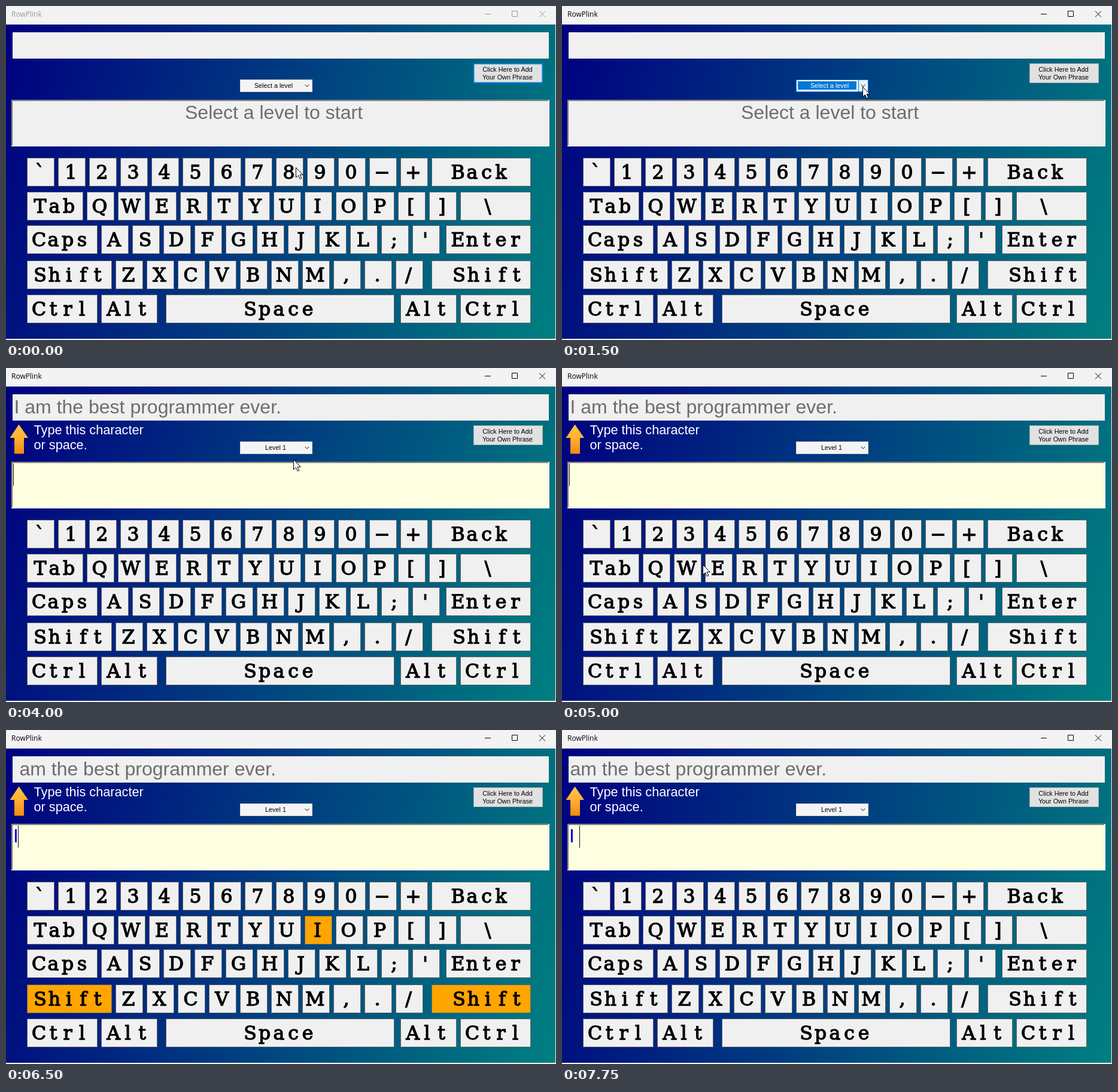
An HTML page that plays this animation: 919 by 559 pixels, repeating every 8 s.

```html
<!DOCTYPE html>
<html lang="en">
<head>
<meta charset="utf-8">
<title>RowPlink</title>
<style>
  html, body { margin: 0; width: 100%; height: 100%; overflow: hidden; }
  svg { display: block; width: 100vw; height: 100vh; }
  text { font-family: "Liberation Sans", Arial, sans-serif; white-space: pre; }
  .title { font: 12px "Open Sans", "Noto Sans", sans-serif; }
  .small { font-size: 10.8px; text-anchor: middle; }
  .big { font-size: 32px; fill: #6d6d6d; }
  .hint { font-size: 21.7px; fill: #fff; }
  .key { fill: #f0f0f0; stroke: #646464; }
  .key.on { fill: #ffa500; }
  .label { font: 31.5px "DejaVu Serif", "Noto Serif", serif; text-anchor: middle; stroke: #000; stroke-width: 1.3; }
  .line { fill: none; stroke: #111; }
</style>
</head>
<body>
<svg viewBox="0 0 919 559" preserveAspectRatio="none">
  <defs>
    <linearGradient id="sea" gradientUnits="userSpaceOnUse" x1="0" y1="30" x2="990" y2="295">
      <stop offset="0" stop-color="#000080"/><stop offset="1" stop-color="#008080"/>
    </linearGradient>
    <linearGradient id="amber" x1="0" y1="0" x2="0" y2="1">
      <stop offset="0" stop-color="#ffc64a"/><stop offset=".45" stop-color="#ffb133"/><stop offset="1" stop-color="#f58a10"/>
    </linearGradient>
  </defs>

  <rect width="919" height="559" fill="#f3f3f3"/>
  <rect y="31" width="918" height="526" fill="url(#sea)"/>
  <g id="bar">
    <text class="title" x="9" y="18">RowPlink</text>
    <path class="line" style="stroke:currentColor" d="M800 13.5h10M845.5 8.5h9v9h-9zM891 8.5l10 10M901 8.5l-10 10"/>
  </g>

  <rect x="11" y="44" width="896" height="44" fill="#f0f0f0"/>
  <text id="phrase" class="big" x="13.5" y="76"></text>

  <rect id="button" x="781.5" y="96.5" width="115" height="32" fill="#e1e1e1"/>
  <text class="small" x="838" y="110">Click Here to Add</text>
  <text class="small" x="838" y="123">Your Own Phrase</text>

  <g id="hint">
    <path d="M21.5 94.5L37 117H30V143.5H14V117H6.5Z" fill="url(#amber)"/>
    <text class="hint" x="46.5" y="111">Type this character</text>
    <text class="hint" x="46.5" y="136">or space.</text>
  </g>

  <path d="M9 235V157H908V235Z" fill="#fff"/>
  <path d="M9 234V157H907V158H10V234Z" fill="#a0a0a0"/>
  <path d="M10 233V158H906V159H11V233Z" fill="#696969"/>
  <rect id="entry" x="11" y="159" width="895" height="74"/>
  <text id="prompt" class="big" x="447.5" y="189" text-anchor="middle">Select a level to start</text>
  <text id="typed" class="big" x="12" y="188" style="fill:#0000f0">I</text>
  <path id="caret" class="line" d="M0 160V197"/>

  <g id="keys"></g>

  <rect id="combo" x="391.5" y="123.5" width="120" height="20"/>
  <rect id="select" x="394" y="126" width="98" height="14" fill="#0078d7"/>
  <rect id="drop" x="495.5" y="123.5" width="16" height="20" stroke="#0078d7"/>
  <path class="line" d="M499.5 131.5l3.5 3.5l3.5-3.5"/>
  <text id="level" class="small" y="137"></text>

  <g id="list">
    <path d="M512 148h3v79h-120v-3h117z" fill="#000" opacity=".35"/>
    <rect x="391.5" y="144.5" width="120" height="79" fill="#fff" stroke="#0078d7"/>
    <rect id="pick" x="392" y="146" width="119" height="13" fill="#0078d7"/>
  </g>

  <path id="pointer" d="M.5 .5V17L4.4 13.4L7.2 19.5L9.8 18.4L7.1 12.4H12.2Z" fill="#fff" stroke="#000"/>
</svg>
<script>
const LOOP = 8000, STEP = 250, PITCH = 24;
const $ = id => document.getElementById(id);
const show = (id, on) => $(id).setAttribute("display", on ? "inline" : "none");
const set = (id, attrs) => {
  for (const name in attrs) $(id).setAttribute(name, attrs[name]);
};
const add = (parent, tag, attrs, text = "") => {
  const node = document.createElementNS("http://www.w3.org/2000/svg", tag);
  for (const name in attrs) node.setAttribute(name, attrs[name]);
  node.textContent = text;
  return parent.appendChild(node);
};

// Key labels sit on a fixed pitch, like typewriter type
const caps = {};
function key(name, x, y, width = 46, center = x + 21.5) {
  const cap = add($("keys"), "rect", { class: "key", x: x + .5, y: y + .5, width: width - 1, height: 47 });
  (caps[name] ??= []).push(cap);
  const cells = [...name].map((_, i) => center + (i - (name.length - 1) / 2) * PITCH);
  add($("keys"), "text", { class: "label", x: cells.join(" "), y: y + 35 }, name);
}
function run(chars, x, y) {
  [...chars].forEach((c, i) => key(c, x + i * 52, y));
}

run("`1234567890−+", 35, 254);
key("Back", 711, 254, 166, 791);
key("Tab", 35, 311, 94, 81);
run("QWERTYUIOP[]", 135, 311);
key("\\", 759, 311, 118, 805);
key("Caps", 35, 367, 118, 91);
run("ASDFGHJKL;'", 159, 367);
key("Enter", 735, 367, 142, 803);
key("Shift", 35, 426, 142, 105);
run("ZXCVBNM,./", 183, 426);
key("Shift", 711, 426, 166, 805);
key("Ctrl", 35, 483, 118, 91);
key("Alt", 159, 483, 94, 203.5);
key("Space", 267, 483, 382, 456);
key("Alt", 659, 483, 94, 703.5);
key("Ctrl", 759, 483, 118, 815);

const items = [1, 2, 3, 4, 5, 6].map(n =>
  add($("list"), "text", { class: "small", x: 450.5, y: 143 + 13 * n }, "Level " + n));

// Pointer stops: time, x, y
const stops = [
  [0, 484, 270], [250, 491, 232], [500, 500, 172], [750, 503, 139], [1000, 502, 132],
  [1500, 502, 135], [1750, 503, 136], [2000, 502, 135], [2750, 499, 138],
  [3000, 495, 141], [3250, 490, 144], [3500, 482, 150], [3750, 480, 153], [5000, 235, 329]
];
const presses = { Shift: [6250, 6750], I: [6500, 6750], Space: [7250, 7500] };

// The screen refreshes four times a second
function draw(time) {
  const t = Math.floor((time % LOOP) / STEP) * STEP;
  const within = (a, b) => t >= a && t < b;
  const active = t >= 750, playing = t >= 3750;
  const focused = within(750, 3750), open = within(2500, 3750), picked = within(3500, 3750);

  const ink = active ? "#000" : "#999";
  set("bar", { fill: ink, color: ink });
  set("button", active ? { stroke: "#adadad", "stroke-width": 1 } : { stroke: "#0078d7", "stroke-width": 2 });

  set("combo", { fill: focused ? "#fff" : "#f4f4f4", stroke: focused ? "#0078d7" : "#d8d8d8" });
  set("drop", { fill: open || t < 1500 ? "#cce4f7" : "#e5f1fb" });
  show("drop", focused);
  show("select", focused);
  set("level", { x: playing ? 450.5 : 447, fill: focused ? "#fff" : "#000" });
  $("level").textContent = playing ? "Level 1" : "Select a level";

  show("list", open);
  show("pick", picked);
  items[0].setAttribute("fill", picked ? "#fff" : "#000");

  show("hint", playing);
  show("prompt", !playing);
  set("entry", { fill: playing ? "#fefee0" : "#f0f0f0" });
  const phrase = "I am the best programmer ever.";
  $("phrase").textContent = playing ? phrase.slice(t < 6500 ? 0 : t < 7250 ? 1 : 2) : "";

  show("typed", t >= 6500);
  const blink = t >= 6500 || (t - 3750) % 1060 < 530;
  show("caret", playing && blink);
  set("caret", { transform: `translate(${t < 6500 ? 12.5 : t < 7250 ? 20.5 : 29.5} 0)` });

  for (const name in presses)
    for (const cap of caps[name]) cap.classList.toggle("on", within(...presses[name]));

  const [, x, y] = stops.findLast(s => s[0] <= t);
  set("pointer", { transform: `translate(${x} ${y})` });
  show("pointer", t < 6500);
}

let start;
function tick(now) {
  start ??= now;
  draw(Math.max(0, now - start));
  requestAnimationFrame(tick);
}
draw(0);
requestAnimationFrame(tick);
</script>
</body>
</html>
```
